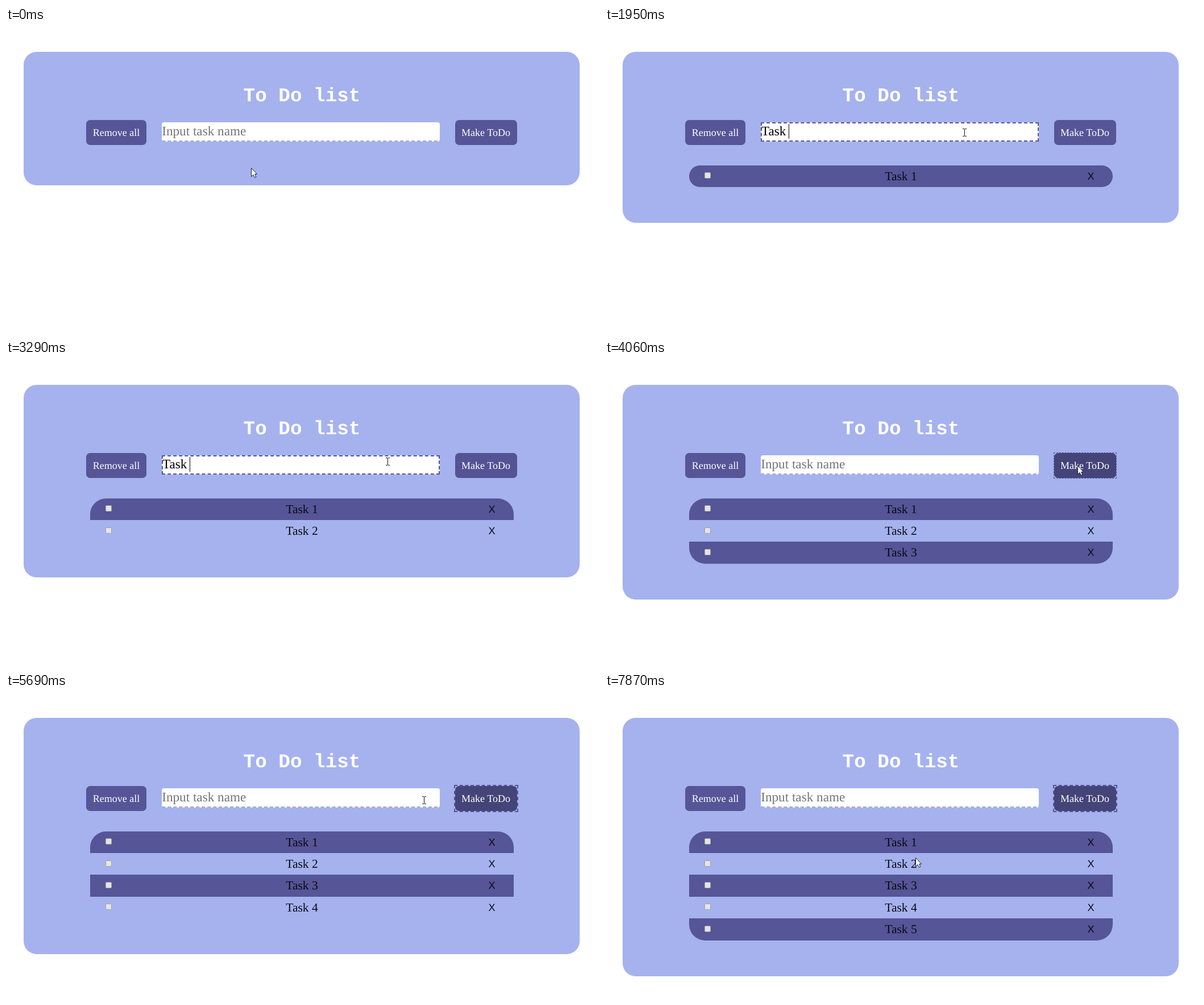
Animation, 1043 px wide and 537 px high, one loop 7990 ms. Source, as an HTML page:

```html
<!DOCTYPE html>
<html lang="en">
<head>
<meta charset="utf-8">
<title>To Do list</title>
<style>
  html, body { margin: 0; width: 100%; height: 100%; overflow: hidden; background: #fff; }
  body { position: relative; text-rendering: geometricPrecision; font-family: "Liberation Serif", "Times New Roman", serif; }
  div, svg { position: absolute; box-sizing: border-box; white-space: pre; }
  #panel { left: 31px; top: 42px; width: 978px; border-radius: 23px; background: #a5b2ee; }
  #title { left: 0; top: 101px; width: 1041px; line-height: 40px; text-align: center; color: #fff;
    font: bold 34.3px/40px "Liberation Mono", "Courier New", monospace; }
  .button { top: 162px; height: 44px; border-radius: 7px; background: #555598; color: #fff;
    font-size: 18px; line-height: 44px; text-align: center; }
  #remove { left: 141px; width: 106px; }
  #make { left: 789.5px; width: 109px; }
  #ring { border: 0 dashed #555598; }
  #field { left: 274px; top: 166px; width: 489px; height: 34px; border-radius: 4px; background: #fff;
    border-bottom: 2px dashed #a5abd2; }
  #focus { left: 274px; top: 166px; width: 489px; height: 34px; background: #fff; border: 2px dashed #555598; }
  #value { top: 166px; font-size: 23.2px; line-height: 33px; }
  #caret { top: 169px; width: 1px; height: 26px; background: #000; }
  #rows { left: 148px; top: 241.6px; width: 745px; }
  .row { left: 0; width: 745px; height: 38.4px; font-size: 21.5px; line-height: 38.4px; text-align: center; color: #0a0a12; }
  .row:nth-child(odd) { background: #555598; }
  .row:first-child { border-top-left-radius: 28px; border-top-right-radius: 28px; }
  .row:last-child { border-bottom-left-radius: 28px; border-bottom-right-radius: 28px; }
  .check { left: 26.5px; top: 12.7px; width: 11px; height: 11px; border: 1px solid #a2a2a2; border-radius: 2px; background: #e4e4e4; }
  .x { left: 696.5px; width: 20px; font: 18px/38.4px "Liberation Sans", Arial, sans-serif; }
  svg { left: 0; top: 0; overflow: visible; }
</style>
</head>
<body>
<div id="panel"></div>
<div id="title">To Do list</div>
<div id="remove" class="button">Remove all</div>
<div id="make" class="button">Make ToDo</div>
<div id="ring"></div>
<div id="field"></div>
<div id="focus"></div>
<div id="value"></div>
<div id="caret"></div>
<div id="rows"></div>
<svg id="pointer" width="20" height="24">
  <path id="arrow" d="M.5 .5V15.6L4 12.4L6.4 17.3L8.8 16.2L6.6 11.3H10.6Z" fill="#fff" stroke="#1c1c38"/>
  <path id="beam" d="M-3.5 -6.5H-1L0 -6L1 -6.5H3.5M0 -6V6M-3.5 6.5H-1L0 6L1 6.5H3.5" fill="none" stroke="#111"/>
</svg>
<script>
const LOOP = 7990, FADE = 300, ROW = 38.4;
const $ = id => document.getElementById(id);
const clamp = v => Math.max(0, Math.min(1, v));
const ease = v => v * v * (3 - 2 * v);

// Screen refreshes: first time, last time, count
const ticks = [0];
for (const [from, to, n] of [
  [100, 860, 8], [970, 1740, 8], [1840, 2630, 8], [2730, 3290, 6], [3600, 4380, 8], [4510, 4730, 2],
  [5050, 5800, 8], [5910, 6120, 2], [6450, 7230, 8], [7330, 7870, 6]
]) for (let i = 0; i < n; i++) ticks.push(Math.floor((from + (to - from) * i / (n - 1)) / 10) * 10);

// One entry per task: times of each user action
const tasks = [
  { focus: 210, type: 320, word: 640, digit: 740, hover: 960, press: 1250, add: 1400 },
  { focus: 1620, type: 1830, word: 1830, digit: 2160, hover: 2380, press: 2540, add: 2730 },
  { focus: 3050, type: 3280, word: 3280, digit: 3600, hover: 3770, press: 3910, add: 4030 },
  { focus: 4370, type: 4730, word: 4730, digit: 5050, hover: 5220, press: 5360, add: 5460 },
  { focus: 5790, type: 6120, word: 6120, digit: 6450, hover: 6800, press: 7130, add: 7330 }
];

// Pointer path: time, x, y
const path = [
  [0, 431, 246], [210, 470, 190], [640, 520, 188], [860, 735, 188], [970, 805, 186], [1300, 837, 181],
  [1410, 837, 181], [1620, 690, 184], [1840, 636, 184], [1950, 632, 184], [2160, 650, 184], [2380, 800, 184],
  [2520, 835, 183], [2730, 835, 183], [2950, 720, 181], [3290, 671, 177], [3600, 680, 179], [3770, 795, 184],
  [3910, 836, 184], [4030, 836, 184], [4270, 725, 188], [4380, 690, 188], [4730, 696, 192], [5050, 696, 192],
  [5220, 795, 187], [5360, 836, 184], [5480, 836, 184], [5700, 730, 187], [5910, 696, 188], [6450, 698, 188],
  [6900, 800, 185], [7040, 832, 183], [7330, 834, 183], [7870, 546, 288]
];

function pointerAt(t) {
  const i = path.findIndex(p => p[0] > t);
  if (i < 0) return path[path.length - 1].slice(1);
  const a = path[i - 1], b = path[i], k = (t - a[0]) / (b[0] - a[0]);
  return [1, 2].map(j => a[j] + (b[j] - a[j]) * k);
}

function typedText(t, task, number) {
  if (t < task.type || t >= task.add) return "";
  if (t >= task.digit) return "Task " + number;
  if (t >= task.word) return "Task ";
  return "Task ".slice(0, 1 + Math.floor(4 * (t - task.type) / (task.word - task.type)));
}

function darkness(t) {
  let v = 0;
  tasks.forEach((task, i) => {
    const end = i + 1 < tasks.length ? tasks[i + 1].focus : LOOP;
    if (t >= task.hover) v = t < end ? clamp((t - task.hover) / FADE) : 1 - clamp((t - end) / FADE);
  });
  return ease(v);
}

function drawRows(n) {
  const list = $("rows");
  if (list.childElementCount === n) return;
  list.innerHTML = "";
  for (let i = 0; i < n; i++) {
    const row = document.createElement("div");
    row.className = "row";
    row.style.top = i * ROW + "px";
    row.innerHTML = `Task ${i + 1}<div class="check" style="text-align:left"></div><div class="x" style="top:0">X</div>`;
    list.append(row);
  }
}

function drawInput(t, task, number) {
  const focused = t >= task.focus && t < task.press;
  const text = typedText(t, task, number);
  const value = $("value"), caret = $("caret");
  const left = focused ? 274.9 : 274.2;
  value.textContent = text || "Input task name";
  value.style.color = text ? "#000" : "#757575";
  value.style.left = left + "px";
  $("field").style.display = focused ? "none" : "";
  $("focus").style.display = caret.style.display = focused ? "" : "none";
  const width = text ? value.getBoundingClientRect().width : 0;
  caret.style.left = Math.max(276, Math.floor(left + width - .4)) + "px";
}

function drawButton(t, task) {
  const k = darkness(t);
  const mix = (a, b) => Math.round(a + (b - a) * k);
  $("make").style.background = `rgb(${mix(85, 68)},${mix(85, 68)},${mix(152, 120)})`;
  const w = t >= task.press ? Math.round(2 * clamp((t - task.press) / FADE)) : 0;
  const ring = $("ring").style;
  ring.display = w ? "" : "none";
  ring.borderWidth = w + "px";
  ring.left = 790 - w + "px";
  ring.top = 162 - w + "px";
  ring.width = 109 + 2 * w + "px";
  ring.height = 44 + 2 * w + "px";
}

function drawPointer(t) {
  const [x, y] = pointerAt(t).map(Math.round);
  const overField = x >= 274 && x < 763 && y >= 166 && y < 200;
  $("pointer").style.transform = `translate(${x + (overField ? .5 : 0)}px,${y}px)`;
  $("arrow").style.display = overField ? "none" : "";
  $("beam").style.display = overField ? "" : "none";
}

function render(t) {
  const count = tasks.filter(task => t >= task.add).length;
  let current = 0;
  tasks.forEach((task, i) => { if (t >= task.focus) current = i; });
  $("panel").style.height = (count ? 301 + ROW * (count - 1) : 235) + "px";
  drawRows(count);
  drawInput(t, tasks[current], current + 1);
  drawButton(t, tasks[current]);
  drawPointer(t);
}

const start = performance.now();
let shown = -1;
function loop() {
  const t = (performance.now() - start) % LOOP;
  const tick = ticks.filter(v => v <= t).pop();
  if (tick !== shown) render(shown = tick);
  requestAnimationFrame(loop);
}
loop();
</script>
</body>
</html>
```
